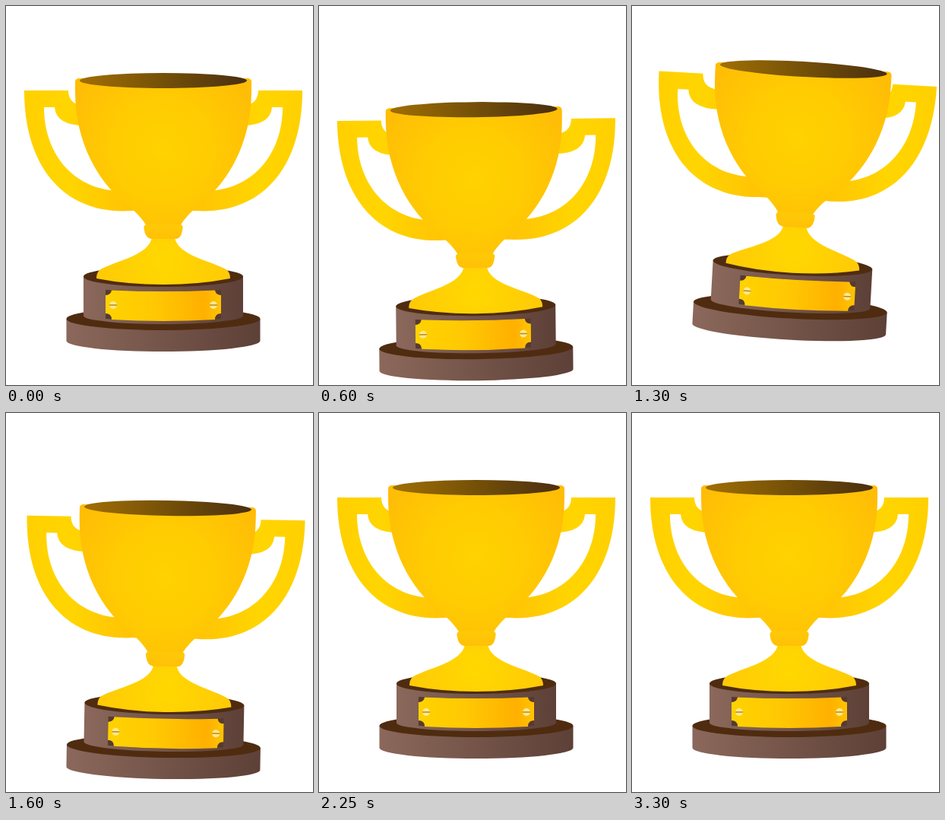
An HTML page for the animation above (9.5 s loop, 404x498 px).

```html
<!DOCTYPE html>
<html lang="en">
<head>
<meta charset="utf-8">
<title>Trophy</title>
<style>
html, body { margin: 0; width: 100%; height: 100%; overflow: hidden; background: #fff; }
svg { display: block; width: 404px; height: 498px; }
</style>
</head>
<body>
<svg viewBox="0 0 404 498">
  <defs>
    <radialGradient id="cupFill" gradientUnits="userSpaceOnUse" cx="205" cy="188" r="135">
      <stop offset="0" stop-color="#ffd200"/>
      <stop offset=".5" stop-color="#ffcb02"/>
      <stop offset="1" stop-color="#ffbd06"/>
    </radialGradient>
    <radialGradient id="footFill" gradientUnits="userSpaceOnUse" cx="207" cy="336" r="95">
      <stop offset="0" stop-color="#ffd800"/>
      <stop offset="1" stop-color="#ffc907"/>
    </radialGradient>
    <linearGradient id="ringFill" x2="0" y2="1">
      <stop offset="0" stop-color="#ffc906"/>
      <stop offset="1" stop-color="#ffc007"/>
    </linearGradient>
    <linearGradient id="rimFill">
      <stop offset="0" stop-color="#a06e04"/>
      <stop offset=".5" stop-color="#745008"/>
      <stop offset="1" stop-color="#4a2f10"/>
    </linearGradient>
    <linearGradient id="handleFill" gradientUnits="userSpaceOnUse" x1="24" x2="166" y1="0" y2="0">
      <stop offset="0" stop-color="#ffd000"/>
      <stop offset=".4" stop-color="#ffd500"/>
      <stop offset="1" stop-color="#ffc305"/>
    </linearGradient>
    <linearGradient id="woodFill">
      <stop offset="0" stop-color="#8b685b"/>
      <stop offset="1" stop-color="#5d4037"/>
    </linearGradient>
    <linearGradient id="plateFill">
      <stop offset="0" stop-color="#ffd200"/>
      <stop offset=".4" stop-color="#ffc903"/>
      <stop offset=".85" stop-color="#ffb000"/>
      <stop offset="1" stop-color="#ffc400"/>
    </linearGradient>
    <path id="bowl" d="M91 100Q91 95 98 95H316Q323 95 323 100V112C323 180 292 232 256 260Q238 274 229 289V299H185V289Q176 274 158 260C122 232 91 180 91 112Z"/>
    <clipPath id="bowlClip"><use href="#bowl"/></clipPath>
    <path id="handle" fill="url(#handleFill)" d="M24 111H82Q82 130 104 131V157Q66 157 64 133H50C50 195 90 243 152 243H182L177 269H165C80 275 24 215 24 111Z"/>
    <g id="screw">
      <circle r="5" fill="#ffe98c"/>
      <path d="M-5 0H5" stroke="#b98a1c" stroke-width="1.5"/>
    </g>
  </defs>
  <g id="trophy">
    <path fill="url(#woodFill)" d="M79.500 411V440A127.500 14 0 0 0 334.500 440V411Z"/>
    <ellipse cx="207" cy="411" rx="127.500" ry="15" fill="#4f2c10"/>
    <path fill="url(#woodFill)" d="M102 355.500V407A105 11 0 0 0 312 407V355.500Z"/>
    <ellipse cx="207" cy="355.500" rx="105" ry="13.500" fill="#4f2c10"/>
    <g id="plate">
      <path fill="#563a30" d="M131 373Q207 377 283 373V411Q207 417 131 411Z"/>
      <path fill="url(#plateFill)" d="M139 373.500Q207 376.500 275 373.500Q276 380 283 380V404Q275 404 275 412Q207 416 139 412Q139 404 131 404V380Q138 380 139 373.500Z"/>
      <use href="#screw" x="141" y="393"/>
      <use href="#screw" x="273" y="393"/>
    </g>
    <g id="handles">
      <use href="#handle"/>
      <use href="#handle" transform="translate(414 0) scale(-1 1)"/>
    </g>
    <path fill="url(#footFill)" d="M192 303C190 328 142 335 123 347Q119 351 119 358Q160 366 207 366T295 358Q295 351 291 347C272 335 224 328 222 303Z"/>
    <use href="#bowl" fill="url(#cupFill)"/>
    <g clip-path="url(#bowlClip)">
      <path id="shine" fill="#fdf065" d="M-1 88H37L53 299H13Z"/>
      <path fill="url(#cupFill)" d="M91 95H323V98A116 19 0 0 1 91 98Z"/>
    </g>
    <ellipse cx="207" cy="98" rx="110" ry="10" fill="url(#rimFill)"/>
    <path fill="url(#ringFill)" d="M186 287H228Q233.500 287 232.500 292Q231 306 223 306H191Q183 305 181.500 292Q181 287 186 287Z"/>
  </g>
  <path id="spark" fill="#fff" d="M0 -1Q.12 -.12 1 0Q.12 .12 0 1Q-.12 .12 -1 0Q-.12 -.12 0 -1Z"/>
</svg>
<script>
const LOOP = 9500, STEP = 50;
const [trophy, plate, handles, shine, spark] =
  ["trophy", "plate", "handles", "shine", "spark"].map(id => document.getElementById(id));

const smooth = x => x * x * (3 - 2 * x);
const settle = x => smooth(Math.sqrt(x));

// Each key: [time, value, easing into it]
const lift = [[0, 0], [520, 47], [975, -61], [1610, 27], [2250, 0, settle]];
const tilt = [[540, 0], [800, -4.2], [1300, 3.2], [1780, 0]];
const turn = [[440, 0], [820, -9.5], [1300, 8], [1780, 0]];
const glow = [[2350, 0], [2830, 40], [3300, 0]];

function track(keys, t) {
  if (t <= keys[0][0]) return keys[0][1];
  for (let i = 1; i < keys.length; i++) {
    const [end, to, ease = smooth] = keys[i];
    const [start, from] = keys[i - 1];
    if (t < end) return from + (to - from) * ease((t - start) / (end - start));
  }
  return keys[keys.length - 1][1];
}

function move(el, x, y = 0, rest = "") {
  el.setAttribute("transform", `translate(${x} ${y}) ${rest}`);
}

function draw(t) {
  const swing = track(turn, t);
  move(trophy, 0, track(lift, t), `rotate(${track(tilt, t)} 207 435)`);
  move(plate, swing);
  move(handles, -0.85 * swing);

  const sweep = (t - 1667) / 500;
  shine.style.display = sweep > 0 && sweep < 1 ? "" : "none";
  move(shine, 47 + 280 * sweep);

  const size = track(glow, t);
  spark.style.display = size > 0 ? "" : "none";
  move(spark, 288, 130.5, `scale(${size})`);
}

const begin = performance.now();
function tick() {
  const t = (performance.now() - begin) % LOOP;
  draw(Math.floor(t / STEP) * STEP);
  requestAnimationFrame(tick);
}
tick();
</script>
</body>
</html>
```
